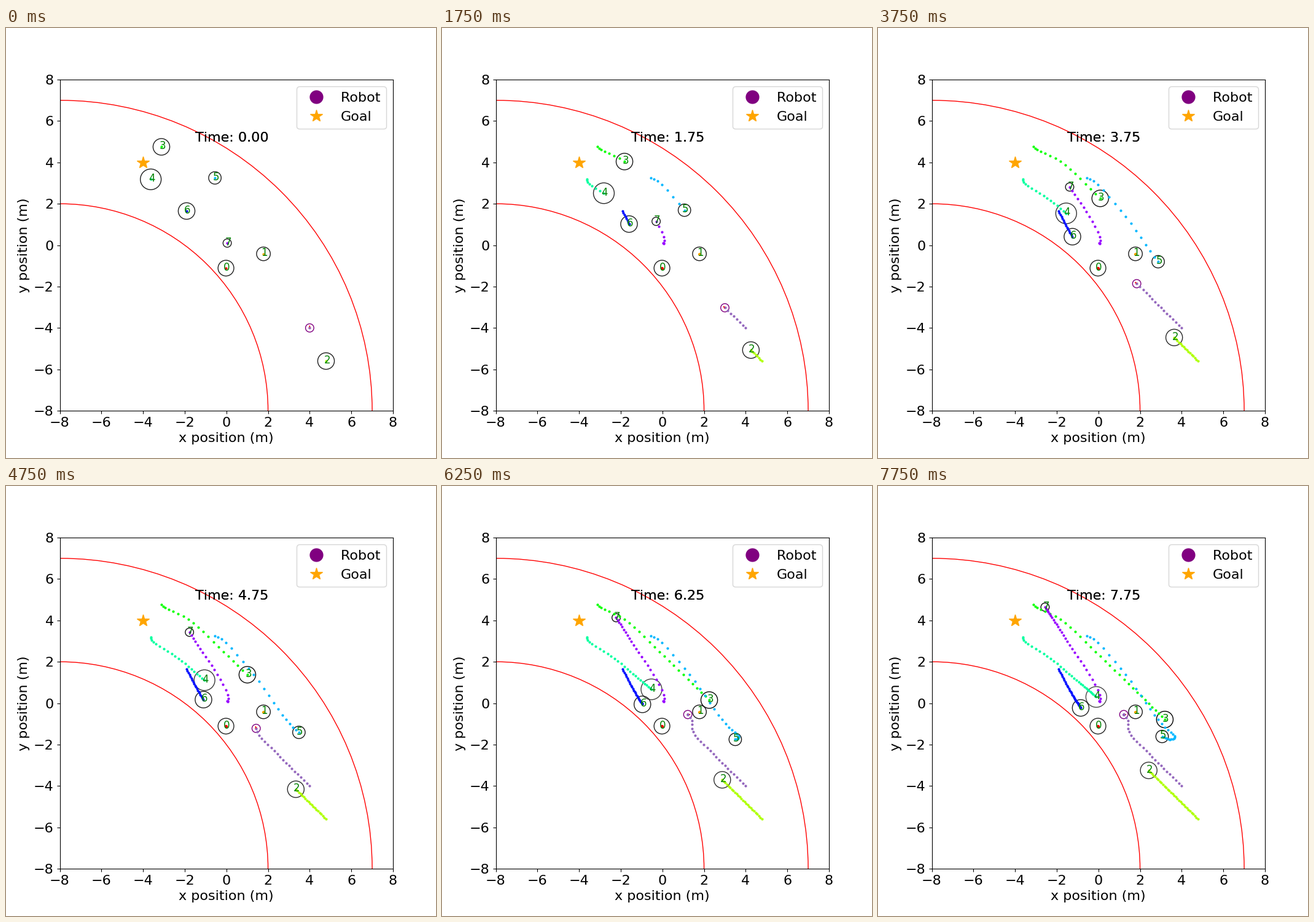
Recreate the animation shown at these times as a matplotlib script. Size 700 by 700 pixels, loop 8000 ms.

```python
import numpy as np
import matplotlib.pyplot as plt
from matplotlib.animation import FuncAnimation
from matplotlib.lines import Line2D
from matplotlib.patches import ArrowStyle, Circle, FancyArrowPatch

STEPS = 32
DT = 0.25
ROBOT_R = 0.2
FONT = 16
RADII = [0.38, 0.33, 0.4, 0.4, 0.5, 0.3, 0.4, 0.2]

# Outlines drift from a common grey to one level per person
GREY_START = 0.12
GREY_END = [0.14, 0.1, 0.2, 0, 0.28, 0.08, 0.12, 0.05]

# Key points: step, x, y
ROBOT = [(0, 4, -4), (11, 2.45, -2.45), (19, 1.43, -1.22),
         (21, 1.41, -0.86), (23, 1.22, -0.55)]
PEOPLE = [
    [(0, -0.02, -1.11), (31, -0.02, -1.11)],
    [(0, 1.78, -0.42), (31, 1.78, -0.42)],
    [(0, 4.785, -5.6), (31, 2.417, -3.25)],
    [(0, -3.12, 4.75), (2, -2.94, 4.62), (7, -1.82, 4.04),
     (15, 0.09, 2.26), (25, 2.25, 0.15), (31, 3.19, -0.79)],
    [(0, -3.63, 3.18), (2, -3.59, 3.05), (4, -3.38, 2.85),
     (7, -2.81, 2.51), (19, -1.05, 1.11), (31, -0.1, 0.3)],
    [(0, -0.55, 3.25), (2, -0.24, 3.1), (7, 1.06, 1.69), (15, 2.87, -0.8),
     (22, 3.67, -1.65), (25, 3.5, -1.75), (31, 3.06, -1.61)],
    [(0, -1.91, 1.65), (7, -1.6, 1.02), (19, -1.1, 0.17), (31, -0.85, -0.23)],
    [(0, 0.04, 0.1), (2, 0.08, 0.1), (4, 0.08, 0.4), (7, -0.3, 1.15),
     (15, -1.38, 2.81), (25, -2.22, 4.13), (31, -2.56, 4.64)],
]


def smooth_path(points):
    """Cubic Hermite curve through the key points, resting at the last one."""
    key, *axes = np.array(points, float).T
    t = np.minimum(np.arange(STEPS), key[-1])
    i = np.clip(np.searchsorted(key, t, side="right") - 1, 0, len(key) - 2)
    h = key[i + 1] - key[i]
    u = (t - key[i]) / h
    cols = []
    for p in axes:
        m = np.gradient(p, key)
        cols.append((1 + 2 * u) * (1 - u) ** 2 * p[i]
                    + u * (1 - u) ** 2 * h * m[i]
                    + u * u * (3 - 2 * u) * p[i + 1]
                    + u * u * (u - 1) * h * m[i + 1])
    return np.column_stack(cols)


def ring(center, radius, color):
    return ax.add_patch(Circle(center, radius, fill=False, ec=color, lw=1))


def trail(color):
    return ax.plot([], [], "o", color=color, ms=3, mew=0)[0]


robot_path = smooth_path(ROBOT)
paths = [smooth_path(p) for p in PEOPLE]

# The robot faces along its last move, and up at the start
moves = np.diff(robot_path, axis=0, prepend=robot_path[:1] - [0, 1])
headings = np.arctan2(moves[:, 1], moves[:, 0])
facing = ROBOT_R * np.column_stack([np.cos(headings), np.sin(headings)])

plt.rcParams["text.kerning_factor"] = 6
fig, ax = plt.subplots(figsize=(7, 7), dpi=100)
ax.set(xlim=(-8, 8), ylim=(-8, 8))
ax.tick_params(labelsize=FONT)
ax.set_xlabel("x position (m)", fontsize=FONT)
ax.set_ylabel("y position (m)", fontsize=FONT)

for r in (10, 15):
    ring((-8, -8), r, "red")

goal = ax.add_line(Line2D([-4], [4], color="orange", marker="*", ls="None", ms=15))
robot_key = Line2D([], [], color="purple", marker="o", ls="None", ms=15)
ax.legend([robot_key, goal], ["Robot", "Goal"], fontsize=FONT, loc="upper right")

robot = ring(robot_path[0], ROBOT_R, "purple")
robot_trail = trail("tab:purple")
arrow = ax.add_patch(FancyArrowPatch(
    (0, 0), (1, 1), color="red",
    arrowstyle=ArrowStyle("->", head_length=2, head_width=1)))

cmap = plt.get_cmap("hsv", 10)
people = [ring(p[0], r, "black") for p, r in zip(paths, RADII)]
trails = [trail(cmap(i)) for i in range(len(paths))]
labels = [ax.text(0, 0, str(i), color="green", fontsize=12)
          for i in range(len(paths))]
# The clock is drawn twice, which makes it slightly heavier
clocks = [ax.text(-1.5, 5, "", fontsize=FONT) for _ in range(2)]


def update(step):
    pos = robot_path[step]
    robot.center = pos
    robot_trail.set_data(*robot_path[:step + 1].T)
    arrow.set_positions(pos, pos + facing[step])
    mix = step / (STEPS - 1)
    for i, path in enumerate(paths):
        x, y = path[step]
        people[i].center = x, y
        grey = GREY_START + (GREY_END[i] - GREY_START) * mix
        people[i].set_edgecolor((grey,) * 3)
        trails[i].set_data(*path[:step + 1].T)
        labels[i].set_position((x - 0.11, y - 0.11))
    for clock in clocks:
        clock.set_text(f"Time: {step * DT:.2f}")
    return [robot, robot_trail, arrow, *people, *trails, *labels, *clocks]


anim = FuncAnimation(fig, update, frames=STEPS, interval=250, repeat=True,
                     repeat_delay=0, blit=False)
plt.show()
```
